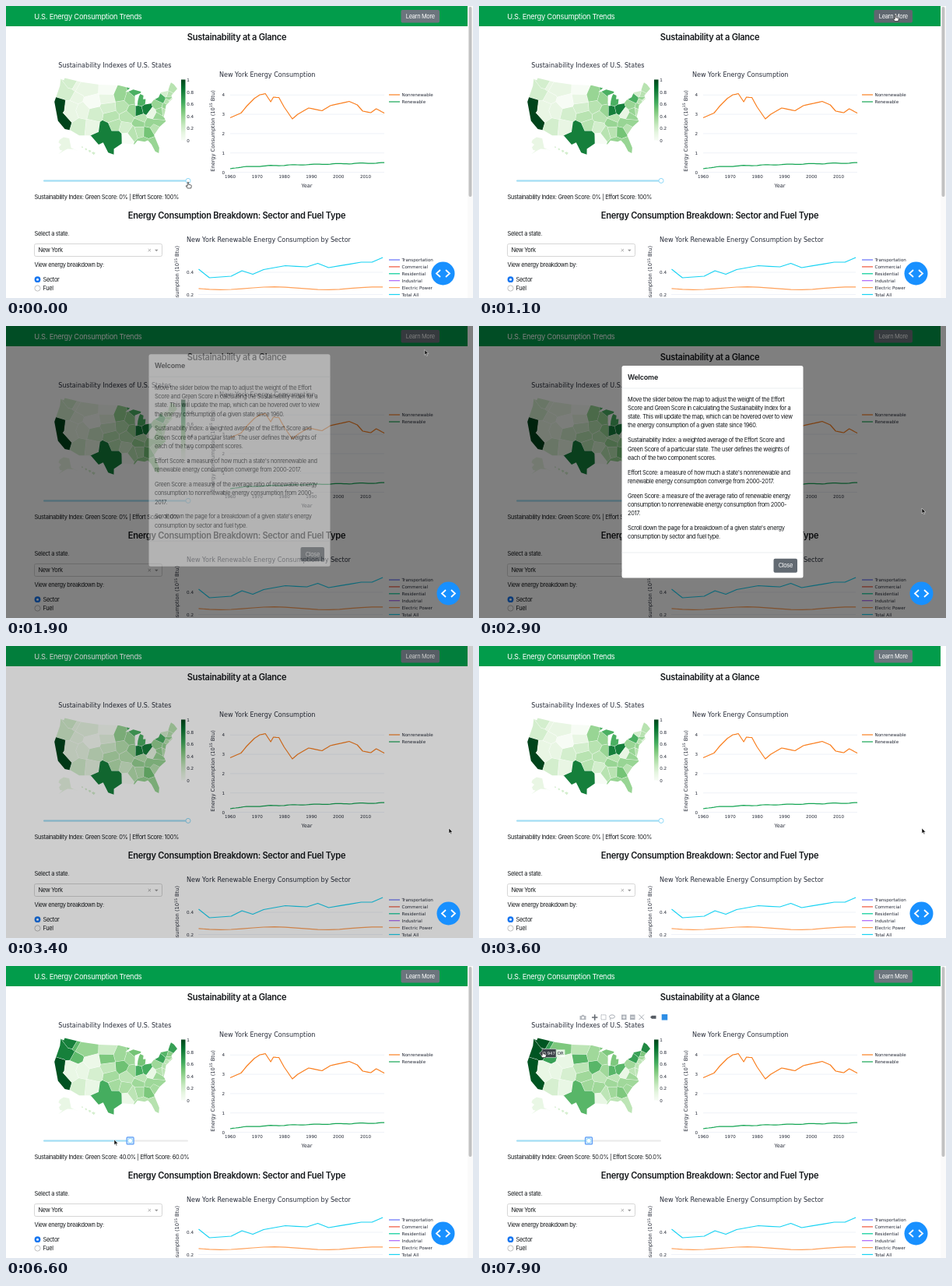
An HTML page that plays this animation: 600 px wide and 375 px high, repeating every 8000 ms.

```html
<!DOCTYPE html>
<html lang="en">
<head>
<meta charset="utf-8">
<title>Energy dashboard</title>
<style>
html, body { margin: 0; width: 100%; height: 100%; overflow: hidden; background: #fff; }
svg { display: block; width: 600px; height: 375px; }
text { font: 7.45px Inter, "Open Sans", sans-serif; letter-spacing: -.045em; fill: #16191c; white-space: pre; }
.brand { font-size: 9.35px; letter-spacing: -.028em; fill: #fff; }
.head { font-size: 11.05px; font-weight: 600; letter-spacing: -.025em; }
.small { font-size: 9px; }
.white { fill: #fff; }
.plot { font: 5.6px "DejaVu Sans", Verdana, sans-serif; letter-spacing: 0; fill: #262b38; }
.title { font-size: 8.05px; }
.axis { font-size: 6.65px; }
.tag { font-size: 5.3px; fill: #fff; }
.mid { text-anchor: middle; }
.end { text-anchor: end; }
.line { fill: none; stroke-width: 1.2; stroke-linejoin: round; }
.grid { stroke: #e8edf5; stroke-width: .7; }
.state { stroke: #fff; stroke-width: .8; stroke-linejoin: round; paint-order: stroke; }
</style>
</head>
<body>
<svg id="stage" viewBox="0 0 600 375"></svg>
<script>
const LOOP = 8000;
const stage = document.getElementById('stage');
const $ = id => document.getElementById(id);

// ---- markup helpers ----
const text = (x, y, s, cls = '', more = '') => `<text x="${x}" y="${y}" class="${cls}" ${more}>${s}</text>`;
const rect = (x, y, w, h, fill, more = '') => `<rect x="${x}" y="${y}" width="${w}" height="${h}" fill="${fill}" ${more}/>`;
const circle = (x, y, r, fill, more = '') => `<circle cx="${x}" cy="${y}" r="${r}" fill="${fill}" ${more}/>`;
const path = (d, more = '') => `<path d="${d}" ${more}/>`;
const range = n => [...Array(n).keys()];
const gridLine = (x, y, w) => path(`M${x} ${y}h${w}`, 'class="grid"');
const toPath = pts => 'M' + pts.map(p => p.map(v => v.toFixed(1)).join(' ')).join('L');
const curve = (fn, count, x0, step, color) =>
  path(toPath(range(count).map(i => [x0 + i * step, fn(i)])), `class="line" stroke="${color}"`);
const legend = (y, color, label) =>
  path(`M492 ${y}h14`, `class="line" stroke="${color}"`) + text(508.5, y + 2, label, 'plot');

const ramp = (t, a, b) => Math.max(0, Math.min(1, (t - a) / (b - a)));
const ease = p => p * p * (3 - 2 * p);
// reads a row of [position, value, ...] keys at a position
function along(keys, at, shape = p => p) {
  const i = Math.max(1, keys.findIndex(k => k[0] >= at));
  const [from, ...a] = keys[i - 1], [to, ...b] = keys[i];
  const p = shape(ramp(at, from, to));
  return a.map((v, j) => v + (b[j] - v) * p);
}

// ---- map: each state is the land nearest to its seeds (west longitude,latitude) ----
const seeds = `WA 118,47.8|OR 118.2,44.2 122,44.2|CA 122,39.8 118,34.9|NV 116.6,40.3 115.6,37.6
ID 116.2,47.4 115.8,43.7|MT 114.4,47 109.8,47|WY 107.5,43|UT 111.4,39.5|CO 105.6,39|AZ 111.7,34.4
NM 106.2,34.6|ND 100.4,47.4|SD 100.3,44.4|NE 99.6,41.5|KS 98.5,38.5|OK 97.2,35.6
TX 97.2,32 95.9,31.5 100.6,34.3 103.5,30.6|MN 94.2,45.6|IA 93.5,41.9|MO 91.4,38.6|AR 92.4,34.5
LA 92.2,31.5|WI 89.8,44.5|IL 89.2,40.2|MI 84.8,43.4 87,46.5|IN 86.3,40|OH 82.9,40.3|KY 85.6,37.4
TN 86.5,36.1|MS 89.8,32.9|AL 86.8,33.4|GA 83.4,33|FL 82.2,28.3 86,29|SC 80.7,33.9|NC 79.2,35.6 82.3,35.6
VA 78.6,37.4|WV 80.8,38.7|PA 77,40.9|MD 76.7,39|DE 75.4,38.9|NJ 74.4,40|NY 75,42.9
VT 72.7,44.2|NH 71.5,43.7|ME 69.2,45.3|MA 72,42.3|CT 72.7,41.6|RI 71.5,41.6`;
const shore = `124.7,48.4 123,48.2 122.8,49 114,49 105,49 95,49 89.6,48 92,46.7 90.5,46.8 88,47.4 84.3,46.4 84.6,46
87.5,45.4 87.8,42 86.8,41.8 86.3,43.5 85.5,45 84.8,45.7 83.4,45 83.8,43.8 82.6,43.8 83.2,42 80.5,42 79,43
76.5,43.6 75,45 71.5,45 70,46.6 69,47.4 67.9,46.5 67,44.8 70.5,43.2 70.5,42 74,40.5 75,38.5 76,37 75.6,35.3
78.5,33.9 81.3,31.5 80.1,27 80.6,25.2 81.8,26 82.8,28.5 84,30 85.3,29.7 88,30.3 89.3,29.2 91.5,29.4 94,29.7
97.2,27.8 97.2,25.9 99.3,26.5 101.4,29.8 103.1,29 106.5,31.8 111,31.3 114.8,32.5 117.1,32.5 120.6,34.6 124.3,40.4 124,46`;
const arctic = `168,65.6 166.5,68.3 156.6,71.3 141,69.6 141,60.3 130,55.5 137,58.5 148,60 154,58.5 164,54.6
157.5,58.6 162,58.7 165,61 161,64`;

// states listed from the lowest score to the highest, one group per step
const grades = list => name => list.split('|').findIndex(g => g.includes(name));
const effort = grades('WY LA ND|MT SD ID UT NV NM WV AK|CO WA OR AZ NE RI AR VT HI|KS OK KY MO IA SC DE CT NH ME AL MS|' +
  'MN WI IL FL TN NC VA MD PA NJ MA|GA|NY MI||TX IN OH||CA');
const balanced = grades('|LA NV UT WY NM WV AK|CO AZ HI|ND KY MO MS FL MD DE NJ CT RI NE|' +
  'KS OK MN WI IL TN SC NC VA PA MA AR AL|MT MI GA NH|SD IA TX IN OH|ID NY VT|ME||WA OR CA');

// Albers equal-area conic
function albers(lat1, lat2, lon0, lat0, k, cx, cy) {
  const rad = Math.PI / 180, sin = a => Math.sin(a * rad);
  const n = (sin(lat1) + sin(lat2)) / 2;
  const c = Math.cos(lat1 * rad) ** 2 + 2 * n * sin(lat1);
  const rho = lat => Math.sqrt(c - 2 * n * sin(lat)) / n;
  return point => {
    const [west, lat] = point.split(',').map(Number);
    const a = n * (lon0 - west) * rad, r = rho(lat);
    return [cx + k * r * Math.sin(a), cy - k * (rho(lat0) - r * Math.cos(a))];
  };
}
const lower = albers(29.5, 45.5, 96, 38.7, 219, 142.7, 141.6);
const alaska = albers(55, 65, 154, 58.5, 77, 75.1, 185.6);

// keeps the part of a polygon that lies nearer to p than to q
function nearer(poly, p, q) {
  const side = ([x, y]) => (x - (p[0] + q[0]) / 2) * (q[0] - p[0]) + (y - (p[1] + q[1]) / 2) * (q[1] - p[1]);
  return poly.flatMap((a, i) => {
    const b = poly[(i + 1) % poly.length], sa = side(a), sb = side(b);
    const out = sa <= 0 ? [a] : [];
    if (sa * sb < 0) out.push(a.map((v, j) => v + (b[j] - v) * sa / (sa - sb)));
    return out;
  });
}
const mainland = seeds.split(/[|\n]/).map(row => {
  const [name, ...pts] = row.split(' ');
  return { name, pts: pts.map(lower) };
});
const frame = [[50, 80], [230, 80], [230, 200], [50, 200]];
for (const s of mainland) {
  const rivals = mainland.filter(o => o !== s).flatMap(o => o.pts);
  s.d = s.pts.map(p => toPath(rivals.reduce((poly, q) => nearer(poly, p, q), frame)) + 'Z').join('');
  [s.x, s.y] = [0, 1].map(j => s.pts.reduce((sum, p) => sum + p[j], 0) / s.pts.length);
}
const isles = range(4).map(i => `M${97 + i * 4.3} ${181 + i * 2.4}l${1 + i * .5}-1 ${1 + i * .5} 1.5-${1 + i * .4} ${1 + i * .5}z`).join('');
const states = [...mainland,
  { name: 'AK', x: 76, y: 180, d: toPath(arctic.split(/\s/).map(alaska)) + 'Z' },
  { name: 'HI', x: 104, y: 185, d: isles }];

const greens = ['f7fcf5', 'e5f5e0', 'c7e9c0', 'a1d99b', '74c476', '41ab5d', '238b45', '006d2c', '00441b'];
const channels = hex => [0, 2, 4].map(j => parseInt(hex.slice(j, j + 2), 16));
const scale = greens.map((g, i) => [i / 8, ...channels(g)]);
const green = v => `rgb(${along(scale, v).map(Math.round)})`;

// ---- chart lines as heights on the stage ----
const fossil = [[0, 143.5], [4, 137.5], [6, 129], [9, 118.5], [11, 114], [13, 112.5], [15, 123], [16, 117], [18, 117.5],
  [20, 130], [23, 145], [25, 139], [29, 131], [34, 134.5], [37, 128], [44, 122.5], [47, 127], [49, 135], [52, 137], [54, 132], [57, 137.5]];
const total = [[0, 338], [1, 349], [3, 347], [4, 340], [5, 344.5], [6, 338.5], [8, 333.5], [10, 335], [11, 330.5], [12, 336], [15, 329], [16, 329], [17, 323]];
const clean = i => 209 - Math.sqrt(i) + .4 * Math.sin(i * .75);
const power = i => 362.5 + 1.8 * Math.sin(i * .65 + .2);

const yTitle = (x, y, cls) => text(0, 0,
  'Energy Consumption (10<tspan dy="-2.4" font-size="4.7">15</tspan><tspan dy="2.4"> Btu)</tspan>',
  'plot axis ' + cls, `transform="translate(${x} ${y}) rotate(-90)"`);

// ---- page sections ----
const nav = rect(0, 0, 593, 26, '#029c4b') + text(36.3, 16.5, 'U.S. Energy Consumption Trends', 'brand') +
  rect(507.5, 5, 49.5, 16.5, '#6c757d', 'rx="2" id="learn"') + text(532.3, 16, 'Learn More', 'white mid');

const map = text(67.3, 79.3, 'Sustainability Indexes of U.S. States', 'plot title') +
  path(toPath(shore.split(/\s/).map(lower)) + 'Z', 'id="land" fill="none"') +
  '<clipPath id="coast"><use href="#land"/></clipPath>' +
  states.map(s => path(s.d, `class="state" ${s.pts ? 'clip-path="url(#coast)"' : ''}`)).join('') +
  rect(225, 94.5, 5.5, 78, 'url(#scale)') +
  range(6).map(i => text(232.2, 97 + i * 15.6, (10 - i * 2) / 10, 'plot')).join('');

const icon = 'fill="none" stroke="#a9aeb5"';
const plusBox = (x, sign) => rect(x, 62.5, 6.5, 6.5, '#adb2b9') + path(`M${x + 1.2} 65.75h4.1${sign}`, 'stroke="#fff"');
const modebar = '<g id="modebar">' +
  path('M129.5 64h2l1-1.3h2l1 1.3h2v5h-8z', 'fill="#b4b8be"') + circle(133.5, 66.3, 1.5, '#fff') +
  path('M145 66h7.4M148.7 62.3v7.4', 'stroke="#666b73" stroke-width="1.6"') +
  rect(157, 62.8, 6, 6, 'none', 'stroke="#a9aeb5" stroke-dasharray="1.4 .7"') +
  `<ellipse cx="171" cy="65" rx="3.5" ry="2.2" ${icon}/>` + path('M169 67q-1.5 1.5.5 2.5', icon) +
  plusBox(183, 'm-2.05-2.05v4.1') + plusBox(194, '') +
  path('M205.500 62.5l6.5 6.5m0-6.5l-6.5 6.5', icon) +
  path('M220 65.8l2-2h5.5v4H222z', 'fill="#555b63"') + rect(234.7, 62, 7.5, 7.5, '#2e8ee6') + '</g>';

const orange = '#fa7f1f', leaf = '#14a553';
const trend = text(274, 91, 'New York Energy Consumption', 'plot title') +
  range(5).map(v => gridLine(288, 213.5 - v * 24.8, 198) + text(281, 215.5 - v * 24.8, v, 'plot end')).join('') +
  range(6).map(i => text(288 + i * 34.8, 220.7, 1960 + i * 10, 'plot mid')).join('') +
  text(386.5, 233, 'Year', 'plot axis mid') + yTitle(267.5, 160.5, 'mid') +
  curve(i => along(fossil, i)[0], 58, 288, 3.475, orange) + curve(clean, 58, 288, 3.475, leaf) +
  legend(114, orange, 'Nonrenewable') + legend(123, leaf, 'Renewable');

const sectors = [['Transportation', '#636efa'], ['Commercial', '#ef553b'], ['Residential', '#00cc96'],
  ['Industrial', '#ab63fa'], ['Electric Power', '#ffa15a'], ['Total All', '#19d3f3']];
const breakdown = text(232, 302.7, 'New York Renewable Energy Consumption by Sector', 'plot title') +
  gridLine(247, 342, 237) + gridLine(247, 370.5, 237) +
  text(241, 344, '0.4', 'plot end') + text(241, 372.5, '0.2', 'plot end') + yTitle(222, 308, 'end') +
  curve(power, 18, 247.5, 13.92, '#ffa15a') + curve(i => along(total, i)[0], 18, 247.5, 13.92, '#19d3f3') +
  sectors.map(([name, color], i) => legend(326 + i * 8.9, color, name)).join('');

const slider = rect(48, 223.4, 186, 2, '#e9e9e9', 'rx="1"') + rect(48, 223.4, 186, 2, '#9fdff8', 'rx="1" id="track"') +
  '<g id="handle">' + rect(-4.5, -4.5, 9, 9, '#d9e9ff', 'id="ring" stroke="#5b9cf5" stroke-width="1.2" rx="1"') +
  circle(0, 0, 3, '#fff', 'stroke="#8fd9f8"') + '</g>' + text(36.5, 247.7, '', '', 'id="index"');

const form = text(36.5, 294.7, 'Select a state.') +
  rect(36.5, 305.5, 164, 16, '#fff', 'stroke="#ccc" stroke-width=".8" rx="2"') + text(41.5, 316.3, 'New York') +
  path('M182.700 312l3.3 3.3m0-3.3l-3.3 3.3', 'stroke="#999" stroke-width=".8"') + path('M191 312.7h4.6l-2.3 2.5z', 'fill="#999"') +
  text(36.5, 335, 'View energy breakdown by:') +
  circle(40.5, 351.2, 3.9, '#1676f0') + circle(40.5, 351.2, 1.5, '#fff') + text(47.5, 353.9, 'Sector') +
  circle(40.5, 362.5, 3.6, '#fff', 'stroke="#a5a5a5" stroke-width=".7"') + text(47.5, 365.2, 'Fuel');

const paragraphs = [
  ['Move the slider below the map to adjust the weight of the Effort', 'Score and Green Score in calculating the Sustainability Index for a', 'state. This will update the map, which can be hovered over to view', 'the energy consumption of a given state since 1960.'],
  ['Sustainability Index: a weighted average of the Effort Score and', 'Green Score of a particular state. The user defines the weights of', 'each of the two component scores.'],
  ["Effort Score: a measure of how much a state's nonrenewable and", 'renewable energy consumption converge from 2000-2017.'],
  ['Green Score: a measure of the average ratio of renewable energy', 'consumption to nonrenewable energy consumption from 2000-', '2017.'],
  ["Scroll down the page for a breakdown of a given state's energy", 'consumption by sector and fuel type.']
];
let lineY = 96.5;
const copy = paragraphs.map(lines => {
  const out = lines.map((s, i) => text(191, lineY + i * 11.3, s)).join('');
  lineY += lines.length * 11.3 + 7.5;
  return out;
}).join('');
const modal = '<g id="modal">' + rect(183.5, 51, 233, 272.5, '#fff', 'rx="2.5"') + text(191, 69, 'Welcome', 'head small') +
  path('M183.500 80h233m-233 211h233', 'stroke="#dee2e6" stroke-width=".6"') + copy +
  rect(378.5, 298.7, 30.5, 18, '#626a72', 'rx="2"') + text(393.8, 310.4, 'Close', 'white mid') + '</g>';

const badge = '<g id="badge">' + circle(0, 0, 15, '#1890ff') +
  path('M-3.5-4.5l-5 4.5 5 4.5M3.5-4.5l5 4.5-5 4.5', 'fill="none" stroke="#fff" stroke-width="1.8"') + '</g>';
const scrollbar = '<g id="scrollbar">' + rect(593, 0, 7, 375, '#fafafa') + rect(594.5, 1, 4, 244, '#c1c1c1', 'rx="2"') + '</g>';
const tip = '<g id="tip">' + path('M0 0l3.5-3v-2.5h18v11h-18V3z', 'fill="#3b4148" stroke="#fff" stroke-width=".5"') +
  text(5, 2, '', 'plot tag', 'id="tipValue"') + rect(21.8, -4.7, 11, 9.4, '#fff', 'opacity=".8"') +
  text(22.8, 2, '', 'plot', 'id="tipName"') + '</g>';
const cursor = path('M0 0v6.8l1.6-1.5 1.1 2.5 1.1-.5-1.1-2.4h2.2z', 'id="arrow" fill="#111" stroke="#fff" stroke-width=".5"') +
  path('M-.8 0q.8-.9 1.5 0v2.8l3 .7q.7.2.6 1l-.6 3h-4.500l-2.100-3q.5-1 2.100.4z', 'id="hand" fill="#fff" stroke="#222" stroke-width=".7"');

stage.innerHTML = '<defs><linearGradient id="scale" x1="0" y1="1" x2="0" y2="0">' +
  greens.map((g, i) => `<stop offset="${i / 8}" stop-color="#${g}"/>`).join('') + '</linearGradient></defs>' +
  rect(0, 0, 600, 375, '#fff') + nav + text(296.5, 44.3, 'Sustainability at a Glance', 'head mid') +
  map + modebar + trend + slider +
  text(296.5, 273, 'Energy Consumption Breakdown: Sector and Fuel Type', 'head mid') + form + breakdown +
  scrollbar + tip + rect(0, 0, 600, 375, '#000', 'id="shade"') + modal + badge + cursor;

// ---- motion ----
const shapes = [...stage.querySelectorAll('.state')];
const moves = [[0, 234, 226.5], [200, 234, 226.5], [950, 535, 12], [1750, 535, 12], [2600, 569, 234], [3700, 569, 234],
  [4500, 234, 226.5], [5500, 234, 226.5], [6500, 139, 223], [6900, 139, 223], [7700, 82, 110], [LOOP, 82, 110]];

const show = (id, on) => $(id).setAttribute('visibility', on ? 'visible' : 'hidden');
const place = (id, x, y) => $(id).setAttribute('transform', `translate(${x} ${y})`);

function setWeight(w) {
  states.forEach((s, i) => {
    const low = effort(s.name) * .1, half = balanced(s.name) * .0947;
    s.value = low + (half - low) * w / .5;
    shapes[i].setAttribute('fill', green(s.value));
  });
  const x = 186 * (1 - w), pct = v => (v * 100).toFixed(1) + '%';
  $('track').setAttribute('width', x);
  place('handle', 48 + x, 224.4);
  $('index').textContent = 'Sustainability Index: Green Score: ' +
    (w ? `${pct(w)} | Effort Score: ${pct(1 - w)}` : '0% | Effort Score: 100%');
}

function draw(t) {
  const [x, y] = along(moves, t, ease);
  setWeight(Math.floor(5 * ramp(t, 5450, 6700)) / 10);
  show('ring', t >= 5500);

  const locked = t >= 1500 && t < 3680;
  show('scrollbar', !locked);
  place('badge', locked ? 568.5 : 561.5, 343.5);
  $('shade').setAttribute('opacity', .5 * (ramp(t, 1500, 1750) - ramp(t, 3250, 3500)));
  const open = ramp(t, 1800, 2050) - ramp(t, 3000, 3250);
  $('modal').setAttribute('opacity', open);
  place('modal', 0, -23 * (1 - ease(open)));

  const onButton = x > 508 && x < 557 && y > 5 && y < 21;
  const focused = t >= 3680 && t < 5500;
  $('learn').setAttribute('fill', focused ? '#50575e' : onButton ? '#5f676f' : '#6c757d');

  const onPlot = t > 6900 && y < 200;
  const spot = stage.createSVGPoint();
  spot.x = x;
  spot.y = y;
  const onLand = onPlot && $('land').isPointInFill(spot);
  const hit = onLand && states.find((s, i) => shapes[i].isPointInFill(spot));
  show('modebar', onPlot);
  show('tip', hit);
  if (hit) {
    place('tip', hit.x, hit.y);
    $('tipValue').textContent = hit.value.toFixed(3);
    $('tipName').textContent = hit.name;
  }

  const onHandle = Math.abs(x - 234) < 5 && y > 220 && y < 230;
  const pointing = onHandle || onButton || hit;
  show('hand', pointing);
  show('arrow', !pointing);
  place('hand', x, y);
  place('arrow', x, y);
}

const start = performance.now();
function tick() {
  draw((performance.now() - start) % LOOP);
  requestAnimationFrame(tick);
}
tick();
</script>
</body>
</html>
```
